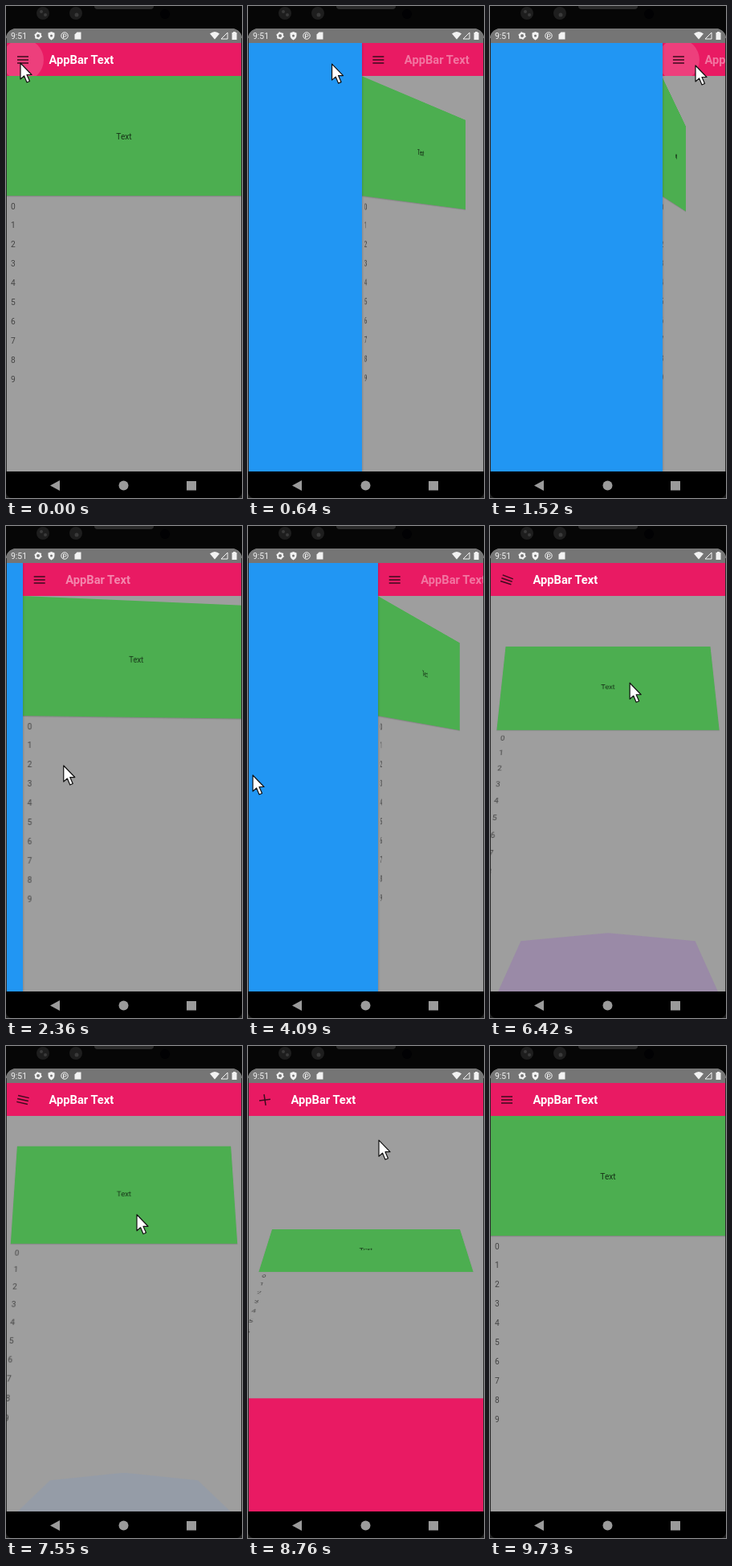
An HTML page that plays this animation: 294x612 px, repeating every 10 s.

```html
<!DOCTYPE html>
<html lang="en">
<head>
<meta charset="utf-8">
<title>Drawer demo</title>
<style>
  html, body { margin: 0; width: 100%; height: 100%; overflow: hidden; background: #1c1c1c; }
  #stage { position: relative; width: 294px; height: 612px; overflow: hidden; border-radius: 0 0 8px 8px; background: #060606; font-family: Roboto, sans-serif; }
  #stage div, #stage svg { position: absolute; }
  #screen { left: 0; top: 28px; width: 294px; height: 551px; overflow: hidden; border-radius: 13px 13px 0 0; background: #9e9e9e; }
  #page { left: 0; top: 59px; width: 294px; height: 491px; }
  #card { left: 0; top: 0; width: 294px; height: 149px; background: #4cae50; color: rgba(0,0,0,.72); font-size: 10.2px; line-height: 151px; text-align: center; box-shadow: 0 1px 1px rgba(0,0,0,.15); }
  .row { left: 6px; font-size: 10.2px; line-height: 12px; color: rgba(0,0,0,.58); }
  #sheet { left: 0; bottom: 0; width: 294px; }
  #bar { left: 0; top: 18px; width: 294px; height: 41px; overflow: hidden; background: #e91a63; }
  #title { left: 53.5px; top: 0; font-size: 14.7px; font-weight: 700; line-height: 43px; color: #fff; white-space: nowrap; }
  #ripple { left: -5px; top: -5px; width: 52px; height: 52px; border-radius: 50%; background: #fff; }
  #drawer { left: 0; top: 18px; height: 533px; background: #2196f3; box-shadow: 0 0 3px rgba(0,0,0,.25); }
  #status { left: 0; top: 0; width: 294px; height: 18px; background: #757575; }
  #clock { left: 6px; top: 0; font-size: 10.4px; line-height: 19px; color: #f0f0f0; }
  #edge { left: 0; top: 40px; width: 292px; height: 539px; border: solid #2b2b2b; border-width: 0 1px; }
  svg { left: 0; top: 0; overflow: visible; }
</style>
</head>
<body>
<div id="stage">
  <div id="screen">
    <div id="page"><div id="card">Text</div></div>
    <div id="sheet"></div>
    <div id="bar">
      <div id="ripple"></div>
      <svg width="42" height="41" stroke="#3d0a1d" stroke-width="1.5">
        <g id="icon"><path d="M-7 0H7"/><path d="M-7 0H7"/><path d="M-7 0H7"/></g>
      </svg>
      <div id="title">AppBar Text</div>
    </div>
    <div id="drawer"></div>
    <div id="status">
      <div id="clock">9:51</div>
      <svg width="294" height="18" fill="#f2f2f2">
        <g fill="none" stroke="#f2f2f2">
          <circle cx="40" cy="9" r="3" stroke-width="2"/>
          <circle cx="40" cy="9" r="4" stroke-width="1.5" stroke-dasharray="1.7 2.5"/>
          <circle cx="73" cy="9" r="4.2"/>
          <path d="M71.5 12V7h2a1.5 1.5 0 0 1 0 3h-2"/>
          <path d="M276 5V13H268z"/>
        </g>
        <path d="M56.5 4l4 1.6v3q0 4-4 5.8q-4-1.8-4-5.8v-3z"/>
        <circle cx="56.5" cy="9" r="1.5" fill="#757575"/>
        <path d="M88.5 4.5H93.5V13.5H85.5V7.5z"/>
        <path d="M254 6.5q6-5 12 0L260 13.5z"/>
        <path d="M281.5 5h1.5v-1h3v1h1.5v9h-6z"/>
      </svg>
    </div>
  </div>
  <div id="edge"></div>
  <svg width="294" height="612">
    <path d="M110 0H184Q184 4 180 4H114Q110 4 110 0z" fill="#2b2b2b"/>
    <g fill="#1e1e1e"><circle cx="46" cy="9" r="8"/><circle cx="87" cy="9" r="8"/></g>
    <g fill="#3a3a3a"><circle cx="44" cy="7" r="2"/><circle cx="49" cy="11" r="2"/><circle cx="88" cy="11" r="2.5"/></g>
    <circle cx="198" cy="10" r="6" fill="#010103"/>
    <path d="M0 579H294V612H0z" fill="#000"/>
    <g fill="#9b9b9b"><path d="M55 596.5L67 590V603z"/><circle cx="146.500" cy="596.5" r="6"/><path d="M225 591H237V602.5H225z"/></g>
    <path id="cursor" d="M0 0V20L4.600 16L8 24L11.500 22.500L8 14.500H14z" fill="#fff" stroke="#111" stroke-width="1.200" stroke-linejoin="round"/>
  </svg>
</div>
<script>
const LOOP = 10000, DRAWER = 236, SHEET = 209;

// Pointer moves: start ms, end ms, destination x and y
const moves = [
  [350, 1150, 256, 74], [1550, 2360, 72, 298], [2360, 2650, 2, 310], [2650, 3300, 238, 312],
  [3300, 4090, 6, 310], [4300, 4870, 195, 287], [5900, 6700, 163, 258], [9300, 9700, 150, 625]
];

const $ = id => document.getElementById(id);
const ramp = (x, a, b) => Math.min(1, Math.max(0, (x - a) / (b - a)));
const smooth = (x, a, b) => { const k = ramp(x, a, b); return k * k * (3 - 2 * k); };
const mix = (a, b, k) => a + (b - a) * k;
// Rises over a..b, stays, falls over c..d
const pulse = (t, a, b, c, d) => ramp(t, a, b) - ramp(t, c, d);

const drawerAt = t => pulse(t, 30, 1050, 1425, 2451) + pulse(t, 2650, 3300, 3768, 4794);
const sheetAt = t => pulse(t, 4870, 5553, 5900, 6700) + pulse(t, 7300, 8388, 8500, 9300);
const rippleAt = t => 1 - ramp(t, 120, 400) + pulse(t, 1400, 1480, 1560, 1800);

// Dragging the sheet carries the pointer along with it
function pointerAt(t, lift) {
  const [x, y] = moves.reduce(([px, py], [a, b, nx, ny]) => {
    const k = ramp(t, a, b);
    return [mix(px, nx, k), mix(py, ny, k)];
  }, [18, 71]);
  return [x, y - lift];
}

for (let i = 0; i < 10; i++) {
  const row = document.createElement('div');
  row.className = 'row';
  row.textContent = i;
  row.style.top = 156.5 + i * 23.9 + 'px';
  $('page').append(row);
}

function drawPage(v, u) {
  const page = $('page').style;
  page.transformOrigin = u > 0 ? '50% 50%' : '0 216px';
  page.transform = u > 0
    ? `translateY(${-9 * smooth(u, .25, .72)}px) perspective(833px) rotateX(${90 * u}deg)`
    : v > 0 ? `translateX(${v * DRAWER}px) perspective(700px) rotateY(${90 * v}deg)` : 'none';
  page.visibility = Math.max(u, v) > .995 ? 'hidden' : 'visible';
}

function drawSheet(u) {
  const k = smooth(u, .2, .6), s = $('sheet').style;
  const foot = 5 * (1 - k), inset = 19 * (1 - k), drop = 20 * (1 - k);
  s.height = u * SHEET + 'px';
  s.opacity = mix(.16, 1, k) * ramp(u, 0, .15);
  s.background = `rgb(${mix(110, 233, k)},${mix(150, 26, k)},${mix(215, 99, k)})`;
  s.clipPath = `polygon(${foot}% 100%, ${inset}% ${drop}%, 50% 0, ${100 - inset}% ${drop}%, ${100 - foot}% 100%)`;
}

// Three bars turn and fold into a cross
function drawIcon(u) {
  const turn = 55 * u + 35 * smooth(u, .75, 1), fold = smooth(u, .3, .7);
  $('icon').setAttribute('transform', `translate(21 21) rotate(${turn})`);
  [...$('icon').children].forEach((line, i) => {
    const side = i - 1;
    line.setAttribute('transform', `translate(0 ${4 * side * (1 - fold)}) rotate(${-45 * side * fold})`);
    line.style.opacity = side ? 1 : 1 - fold;
  });
}

function draw(t) {
  const v = drawerAt(t), u = sheetAt(t), [x, y] = pointerAt(t, u * SHEET);
  drawPage(v, u);
  drawSheet(u);
  drawIcon(u);
  $('bar').style.transform = `translateX(${v * DRAWER}px)`;
  $('title').style.opacity = 1 - .6 * ramp(v, 0, .1);
  $('drawer').style.width = v * DRAWER + .6 + 'px';
  $('drawer').style.visibility = v > 0 ? 'visible' : 'hidden';
  $('ripple').style.opacity = .16 * rippleAt(t);
  $('cursor').setAttribute('transform', `translate(${x} ${y})`);
}

const start = performance.now();
function tick() {
  draw((performance.now() - start) % LOOP);
  requestAnimationFrame(tick);
}
tick();
</script>
</body>
</html>
```
